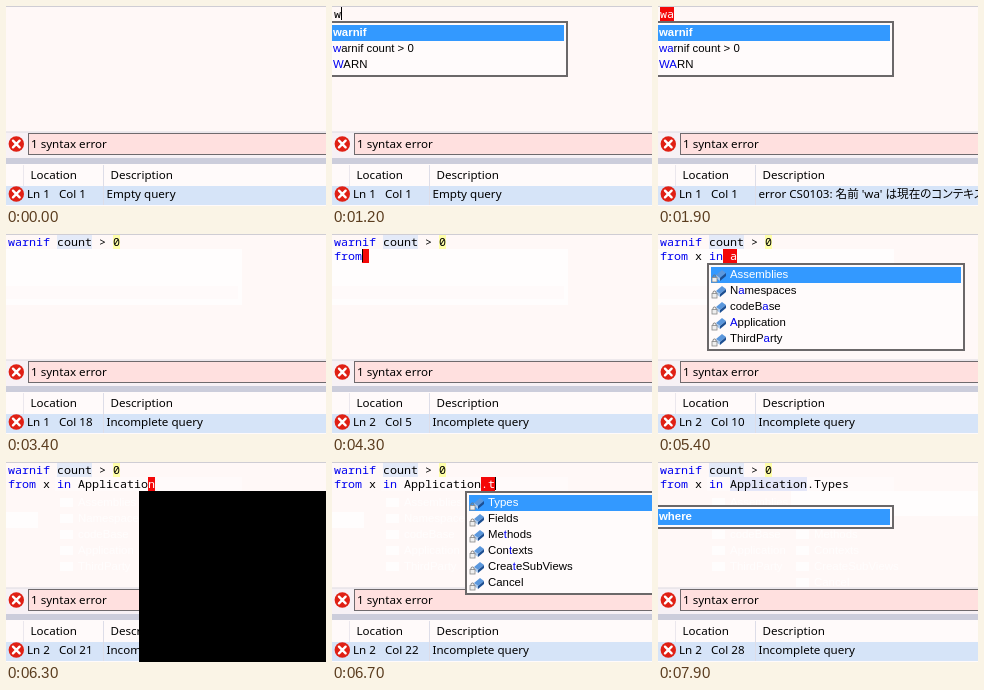
Animation, 320 px wide and 200 px high, one loop 8 s. Source, as an HTML page:

```html
<!DOCTYPE html>
<html lang="en">
<head>
<meta charset="utf-8">
<title>Query editor completion</title>
<style>
html, body { margin: 0; width: 100%; height: 100%; overflow: hidden; background: #fff8f7; }
svg { display: block; width: 100%; height: 100%; }
text { white-space: pre; }
.ui { font: 11.6px "Noto Sans", "Noto Sans CJK JP", "Noto Sans CJK", sans-serif; font-feature-settings: "palt"; fill: #000; }
.code { font: 11.667px "Noto Sans Mono", "Liberation Mono", monospace; }
.list { font: 11.4px "Liberation Sans", sans-serif; }
.bold { font-weight: bold; }
</style>
</head>
<body>
<svg id="stage" viewBox="0 0 320 200" preserveAspectRatio="none"></svg>
<script>
const LOOP = 8000, CHAR = 7, LINE = 14, LEFT = 2, ROW = 16;
const stage = document.getElementById('stage');

const esc = s => s.replace(/&/g, '&amp;').replace(/</g, '&lt;').replace(/>/g, '&gt;');
const rect = (x, y, w, h, fill, extra = '') =>
  `<rect x="${x}" y="${y}" width="${w}" height="${h}" fill="${fill}" ${extra}/>`;
const text = (x, y, s, cls = 'ui', extra = '') =>
  `<text x="${x}" y="${y}" class="${cls}" ${extra}>${s}</text>`;
const colX = col => LEFT + col * CHAR;
const cell = (row, col, n, fill) => rect(colX(col), 1 + row * LINE, n * CHAR, LINE, fill);

const unknown = name => `error CS0103: 名前 '${name}' は現在のコンテキストに存在しません`;
const menu = (x, row, items, match = '', sel = 0, extra = {}) =>
  ({ x, y: 1 + (row + 1) * LINE, w: 240, items, match, sel, ...extra });
const startMenu = (row, items, match, sel) => menu(-4, row, items, match, sel);
const wide = (x, items, match) => menu(x, 1, items, match, 0, { w: 258, icons: true });

const warnItems = ['warnif', 'warnif count > 0', 'WARN'];
const scopeItems = ['Assemblies', 'Namespaces', 'codeBase', 'Application', 'ThirdParty'];
const memberItems = ['Assemblies', 'Namespaces', 'Types', 'Methods', 'Fields', 'Contexts',
  'CreateSubViews', 'Cancel', 'Name', 'Parent', 'Version'];
const typeItems = ['Types', 'Fields', 'Methods', 'Contexts', 'CreateSubViews', 'Cancel'];
const rule = 'warnif count > 0';

// Each step changes part of the state and keeps the rest.
const steps = [
  [0, { lines: [], red: null, caret: null, menu: null, marks: 0, ln: 1, col: 1, msg: 'Empty query', ghost: 0 }],
  [200, { caret: [0, 0] }],
  [500, { caret: null }],
  [900, { caret: [0, 0] }],
  [1200, { lines: ['w'], caret: [0, 1], menu: startMenu(0, warnItems, 'w') }],
  [1400, { red: [0, 0, 1], msg: unknown('w') }],
  [1700, { lines: ['wa'], red: [0, 0, 2], caret: null, menu: startMenu(0, warnItems, 'wa') }],
  [1900, { msg: unknown('wa') }],
  [2000, { menu: startMenu(0, warnItems, 'wa', 1) }],
  [2200, { caret: [0, 2] }],
  [2400, { lines: [rule], red: null, caret: [0, 16], menu: null, ghost: 1 }],
  [2500, { red: [0, 16, 1], col: 17, msg: 'Incomplete query' }],
  [2900, { lines: [rule, ''], red: null, caret: [1, 0], marks: 1 }],
  [3100, { col: 18 }],
  [3400, { caret: null }],
  [3500, { menu: startMenu(1, ['from']) }],
  [3700, { lines: [rule, 'f'], caret: [1, 1], menu: startMenu(1, ['from'], 'f') }],
  [3900, { red: [1, 0, 1], ln: 2, col: 1 }],
  [4100, { lines: [rule, 'from'], red: null, caret: [1, 4], menu: null }],
  [4200, { red: [1, 4, 1], col: 5 }],
  [4500, { lines: [rule, 'from x'], red: [1, 4, 2], caret: [1, 6] }],
  [4700, { lines: [rule, 'from x '], red: [1, 6, 1], caret: [1, 7], col: 7, menu: menu(49, 1, ['in']) }],
  [4900, { lines: [rule, 'from x i'], red: [1, 6, 2], caret: [1, 8], menu: menu(49, 1, ['in'], 'i') }],
  [5100, { lines: [rule, 'from x in'], red: null, caret: [1, 9], menu: null }],
  [5200, { red: [1, 9, 1], col: 10 }],
  [5400, { lines: [rule, 'from x in a'], red: [1, 9, 2], caret: null, menu: wide(49, scopeItems, 'a') }],
  [5600, { lines: [rule, 'from x in ap'], red: [1, 9, 3], caret: [1, 12], menu: wide(49, ['Application'], 'ap') }],
  [5800, { red: [1, 10, 2], col: 11 }],
  [6000, { lines: [rule, 'from x in Application'], red: null, caret: [1, 21], menu: null, ghost: 2 }],
  [6100, { red: [1, 20, 1], col: 21 }],
  [6300, { caret: null, black: true }],
  [6400, { black: false, lines: [rule, 'from x in Application.'], red: [1, 21, 1], caret: [1, 22], menu: wide(133, memberItems, '') }],
  [6600, { lines: [rule, 'from x in Application.t'], red: [1, 21, 2], caret: [1, 23], col: 22, menu: wide(133, typeItems, 't') }],
  [7000, { lines: [rule, 'from x in Application.Types'], red: null, caret: [1, 27], menu: null, ghost: 3 }],
  [7100, { col: 28 }],
  [7400, { marks: 2, caret: null }],
  [7900, { menu: startMenu(2, ['where']) }]
];

function errorIcon(y) {
  return `<circle cx="10.3" cy="${y}" r="7.7" fill="#e02014"/>
    <path d="M7 ${y - 3.3}l6.6 6.6m0 -6.6l-6.6 6.6" stroke="#fff" stroke-width="2.4" stroke-linecap="round"/>`;
}

const frame = rect(0, 0, 320, 200, '#fff8f7') + rect(0, 0, 320, 1, '#cfcdd4');

const panel = rect(0, 126, 320, 26, '#f7f1f5') + rect(0, 125.5, 320, 1, '#dedbe2') +
  rect(22.5, 127.5, 310, 21, '#ffe0df', 'stroke="#6f6a6d"') + errorIcon(138) +
  text(25, 142, '1 syntax error') +
  rect(0, 152, 320, 6, '#cccddb') + rect(0, 158, 320, 42, '#fffafa') +
  rect(0, 180, 320, 19, '#d6e4f8') + rect(17, 159, 1, 21, '#ebe7ed') +
  rect(97, 159, 1, 40, '#dddde8') + text(24.5, 173, 'Location') + text(104.5, 173, 'Description') +
  errorIcon(188);

function ghostList(items, x, pale) {
  return items.map((s, i) => rect(x + 5, 36 + i * ROW, 13, 9, pale) +
    text(x + 23, 44 + i * ROW, s, 'list', `fill="${pale}"`)).join('');
}

function ghosts(level) {
  const pale = '#fffdfd';
  let out = '';
  if (level === 1) out += rect(0, 15, 236, 56, pale) + rect(0, 52, 232, 13, '#fffafa');
  if (level >= 2) {
    out += rect(0, 50, 32, 16, pale) + rect(49, 15, 187, 14, '#fffafa') + ghostList(scopeItems, 49, pale);
  }
  if (level === 3) out += rect(133, 29, 187, 25, pale) + ghostList(typeItems, 133, pale);
  return out;
}

function codeLine(s, row, red) {
  const isRed = i => red && red[0] === row && i >= red[1] && i < red[1] + red[2];
  const keyword = new Set();
  for (const m of s.matchAll(/\b(warnif|from|in)\b/g))
    for (let i = 0; i < m[0].length; i++) keyword.add(m.index + i);
  const spans = [...s].map((c, i) => {
    const fill = isRed(i) ? '#fff' : keyword.has(i) ? '#0000f0' : '#000';
    return `<tspan fill="${fill}">${esc(c)}</tspan>`;
  });
  return text(LEFT, 12 + row * LINE, spans.join(''), 'code');
}

function label(s, match) {
  const at = match ? s.toLowerCase().indexOf(match) : -1;
  if (at < 0) return esc(s);
  const end = at + match.length;
  return `${esc(s.slice(0, at))}<tspan fill="#0000f0">${esc(s.slice(at, end))}</tspan>${esc(s.slice(end))}`;
}

// A blue block lying at an angle, with a small padlock at its lower left.
function itemIcon(x, y) {
  return `<g transform="translate(${x} ${y})">
    <path d="M5 6l6 -5 4 3 -6 5z" fill="#5b97dc"/><path d="M5 6l4 3v3l-4 -3z" fill="#a9c8ec"/>
    <path d="M9 9l6 -5v3l-6 5z" fill="#1d4f92"/>
    <path d="M2 9v-1.5a1.5 1.5 0 0 1 3 0V9" fill="none" stroke="#777"/>
    <rect x="1" y="8.5" width="5" height="4.5" fill="#eee" stroke="#888" stroke-width=".8"/></g>`;
}

function drawMenu({ x, y, w, items, match, sel, icons }) {
  const h = items.length * ROW + 8;
  const inset = icons ? 23 : 5;
  let out = rect(x + 1, y + 1, w - 2, h - 2, '#fffbfb', 'stroke="#6b6869" stroke-width="2"');
  items.forEach((s, i) => {
    const top = y + 4 + i * ROW, on = i === sel;
    if (on) out += rect(x + 4, top, w - 8, ROW, '#3399ff');
    if (icons) out += itemIcon(x + 4, top + 2);
    out += text(x + inset, top + 11, on ? esc(s) : label(s, match),
      on && !icons ? 'list bold' : 'list', `fill="${on ? '#fff' : '#000'}"`);
  });
  return out;
}

function draw(s) {
  let out = frame + ghosts(s.ghost);
  if (s.marks) out += cell(0, 7, 5, '#e4eaf8') + cell(0, 15, 1, '#ffffa8');
  if (s.marks > 1) out += cell(1, 10, 11, '#e4e6f8');
  if (s.red) out += cell(...s.red, '#f40808');
  s.lines.forEach((line, row) => out += codeLine(line, row, s.red));
  if (s.caret) out += rect(colX(s.caret[1]), 1 + s.caret[0] * LINE, 1, 13, '#000');
  out += panel + text(21, 192, `Ln ${s.ln}`) + text(53, 192, `Col ${s.col}`) + text(100.5, 192, esc(s.msg));
  if (s.menu) out += drawMenu(s.menu);
  if (s.black) out += rect(133, 29, 187, 171, '#000');
  stage.innerHTML = out;
}

const start = performance.now();
let shown = -1;
function tick() {
  const t = Math.max(0, performance.now() - start) % LOOP;
  const count = steps.filter(([at]) => at <= t).length;
  if (count !== shown) {
    shown = count;
    draw(Object.assign({}, ...steps.slice(0, count).map(step => step[1])));
  }
  requestAnimationFrame(tick);
}
tick();
</script>
</body>
</html>
```
